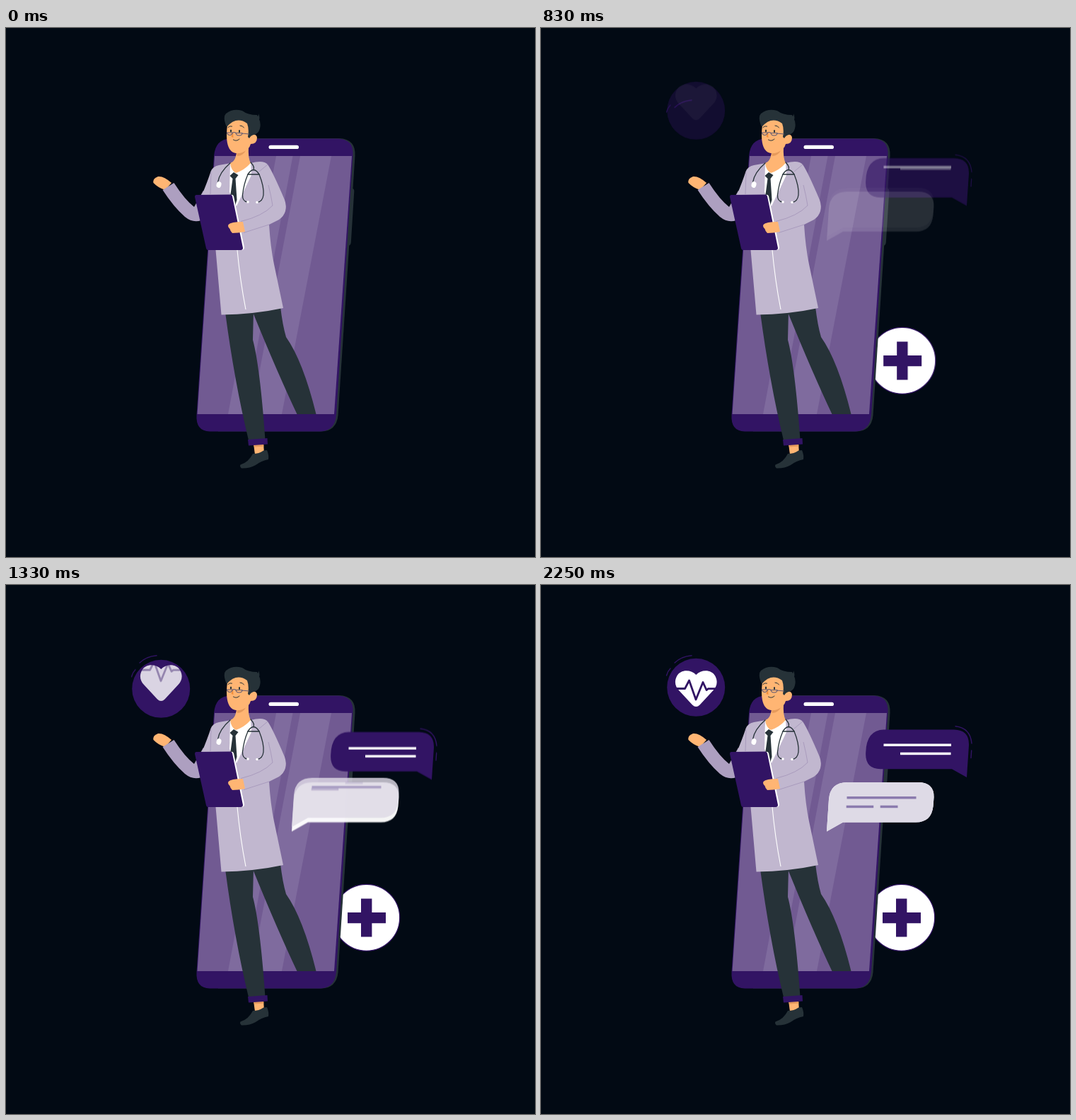
An HTML page for the animation above (2.33 s loop, 748 by 748 pixels).

```html
<!DOCTYPE html>
<html lang="en">
<head>
<meta charset="utf-8">
<title>Online doctor</title>
<style>
  html, body { margin: 0; width: 100%; height: 100%; overflow: hidden; background: #020a14; }
  svg { display: block; width: 100vw; height: 100vh; }
  .purple { fill: #321464; }
  .dark { fill: #263238; }
  .skin { fill: #ffb573; }
  .coat { fill: #c1b7cf; }
  .white { fill: #fff; }
  .line { fill: none; stroke: #263238; stroke-width: 1.3; stroke-linecap: round; }
  .dash { fill: none; stroke: #321464; stroke-width: 1.4; stroke-linecap: round; }
  .fold { fill: none; stroke: #a394b8; stroke-width: .8; }
</style>
</head>
<body>
<svg viewBox="0 0 748 748">
  <g data-delay="0" data-from="x">
    <circle class="white" cx="509.7" cy="470.3" r="47" stroke="#321464" stroke-width="1.2"/>
    <path class="purple" d="M502 443.5h15.4V463H537v15.3h-19.600V497.500H502V478.300H483V463h19z"/>
  </g>

  <g id="phone">
    <path class="dark" d="M320 156H471Q495 157 493.500 181L469.500 548Q467 570 446 570.500H300Z"/>
    <path class="dark" d="M489.500 227Q492.500 227 492.300 231L487.800 303Q487.500 307 484.500 308Z"/>
    <path class="purple" d="M317 156.500H469Q492 157 490.500 180L467 547Q465 570 444 570.500H288Q268 570 269.500 547L294 181Q296 157 317 156.500Z"/>
    <path fill="#715a92" d="M295 181H489L464 546H270.500Z"/>
    <path fill="#7f6b9e" d="M382 181H405.500L337.500 546H314ZM416 181H460L390 546H347Z"/>
    <rect class="white" x="371.500" y="165.700" width="42.500" height="5.400" rx="2.700"/>
  </g>

  <g id="doctor">
    <path class="dark" d="M349 402L388 394Q391 420 396 437Q420 471 438.500 546H411.500Q384 488 349 402Z"/>
    <path class="skin" d="M350 588L364 587L365 601L352 603Z"/>
    <path fill="#e59a5c" d="M350 589L364 588L364.500 591.500L351 592.500Z"/>
    <path class="dark" d="M310 402L350 400L349 441Q359 478 366.500 582L343 583Q323 500 310 402Z"/>
    <path class="purple" d="M342 582L369.500 580L370 588.500L343 590.500Z"/>
    <path class="dark" d="M349 602Q358 602 364 597.500L369 597Q372 604 371 610Q361 612 353 618Q344 623 333 622.500Q330 620 331.500 617.500Q343 614 349 602Z"/>

    <path class="skin" d="M234 219Q223 209 215 210Q207 213 208.500 219Q215 226 225 229Z"/>
    <path fill="#ad9fc0" d="M221.500 229L237.500 219Q253 243 266 253L279 230L296 250L276 272Q264 276 253 267Q237 253 221.500 229Z"/>
    <path class="coat" d="M277 236Q285 217 289.500 203Q292 196 301 194L318 191H346Q364 186 370 193Q377 203 394 243Q400 261 386 271L372 278Q374 310 379 334L392 396Q350 405 304.500 405.500L296.500 314L290 250Z"/>
    <path class="white" d="M317 191L316 232L326 252L347 208L346 190Z"/>
    <path class="skin" d="M326 172L343 168Q342 184 346 191Q337 201 325 205Q318 201 317 191Q326 188 326 172Z"/>
    <path fill="#e59a5c" d="M326 176Q334 177 340 172Q335 181 327 181Z"/>
    <path class="dark" d="M316.500 209L322 204L328.500 208L324.500 213L326.500 243L324 251L317 239L320.500 213Z"/>
    <path class="fold" d="M290 203L289 235M358 203L370 193M371 222Q375 238 377 251Q363 266 332 273.500M336 289.500L372 278"/>
    <path d="M327 314Q331 357 339 398" fill="none" stroke="#fff" stroke-width="1.1"/>

    <path class="line" d="M317 191Q302 204 299.500 218M346 190Q352 196 350 201M341.500 246Q334 245 334.500 236Q336 221 342 207Q350 194 358 207Q365 224 364 236Q363 245 355.500 246.500M341.500 207H358.500"/>
    <ellipse class="white" cx="301" cy="221.500" rx="3.400" ry="4.500" transform="rotate(15 301 221.500)"/>
    <circle class="white" cx="342" cy="246" r="1.800"/>
    <circle class="white" cx="355" cy="246.500" r="1.800"/>

    <path class="white" d="M300 236H318Q321 235 322 238L337 310Q337 313.500 334 314H310Z"/>
    <path class="purple" d="M269 236L317 235.500Q319.500 235.500 320 238L335 311Q335 314 332 314H286Q283.500 314 283 311.500L267 239Q267 236 269 236Z"/>
    <path class="skin" d="M335 274L338 288Q328 290 320 290Q317 287 316.500 284Q313 281 314.500 278Q318 274 335 274Z"/>

    <path class="skin" d="M313 137Q310 161 316 171Q322 180 334 176Q344 172 346 164Q355 164 355 155Q354 149 347 151L344 131L322 126Z"/>
    <path class="dark" d="M312 140Q306 126 311 121Q321 113 334 117Q342 123 355 123L357 127Q361 134 359 142Q357 150 350 151Q346 152 344 156L342 154Q344 143 341 135Q326 124 312 140ZM355 126Q357 125 357 121Q360 128 357 131Z"/>
    <path class="line" d="M314 140.500Q316 138 319.500 139M331 138Q335 138 336.500 141M321.500 158Q326 161 330 157" style="stroke-width:1"/>
    <path d="M321 146L318.500 154L321.500 155Z" fill="#f28f3b"/>
    <ellipse class="dark" cx="318" cy="145.500" rx="1.100" ry="1.900"/>
    <ellipse class="dark" cx="330" cy="146" rx="1.100" ry="1.900"/>
    <path d="M312 148H320Q320 151.500 316 151.500Q313 151 312.500 148M320 148.500Q323 146.500 325 148.500H334Q334 152 329.500 152Q325.500 152 325 148.500M334 149L344 150" fill="none" stroke="#625b72" stroke-width="1.100"/>
  </g>

  <g data-delay="0">
    <path data-delay="0" class="dash" d="M189 110Q198 101 213 99.700"/>
    <path data-delay=".2" class="dash" d="M177.500 128Q179 122 183 118"/>
    <circle data-delay=".4" class="purple" cx="219.200" cy="144.800" r="41"/>
    <path data-delay=".6" class="white" d="M219.300 127C212 119 197 119 192 129C188 137 190 144 195 149L214 169.500Q219.300 174.500 224.500 169.500L243.500 149C248.500 144 250.500 137 246.500 129C241.500 119 226.500 119 219.300 127Z"/>
    <path data-delay=".8" d="M190 146.500H203.500L209.500 135L219 162L229 137.500L234 148.500L236.500 146.700H248.500" fill="none" stroke="#321464" stroke-width="2.800" stroke-linejoin="round"/>
  </g>

  <g data-delay=".2">
    <path data-delay=".2" class="dash" d="M586 199.700Q607 202 609 224"/>
    <path data-delay=".2" class="dash" d="M608.700 234L608 244.500"/>
    <path data-delay=".2" class="purple" d="M485 204.500H584Q606 205 605 227L602 272L581 260.300H480Q458 260 459.200 237Q460 205 485 204.500Z"/>
    <rect data-delay=".3" class="white" x="484.500" y="224.500" width="95.500" height="3.500"/>
    <rect data-delay=".4" class="white" x="508" y="236.700" width="71.500" height="3.500"/>
    <path data-delay=".5" class="white bubble"/>
    <path data-delay=".6" class="bubble" fill="#dedae6"/>
    <g fill="#8b7bae">
      <rect data-delay=".7" x="432.500" y="299" width="98" height="3.500"/>
      <rect data-delay=".8" x="431.700" y="311.700" width="38.500" height="3.500"/>
      <rect data-delay=".9" x="479.700" y="311.700" width="24.800" height="3.500"/>
    </g>
  </g>
</svg>
<script>
  const LOOP = 2330, FRAMES = 56, SECOND = LOOP / 2, SHIFT = 44.9;
  const bubble = 'M433 279H533Q556 279 555.500 300L554.500 313Q552 335.500 530 335.500H427L404 348.500L407 303Q409 279 433 279Z';
  document.querySelectorAll('.bubble').forEach(el => el.setAttribute('d', bubble));

  // Every part fades and slides in with a small overshoot; nested parts add up.
  const slides = [...document.querySelectorAll('[data-delay]')].map(el => {
    const axis = el.dataset.from === 'x' ? 'X' : 'Y';
    const slide = el.animate([
      { opacity: 0, transform: `translate${axis}(${-SHIFT}px)` },
      { opacity: 1, transform: `translate${axis}(0px)` }
    ], {
      duration: SECOND,
      delay: el.dataset.delay * SECOND,
      easing: 'cubic-bezier(.36, -.01, .5, 1.38)',
      fill: 'both'
    });
    slide.pause();
    return slide;
  });

  const step = LOOP / FRAMES;
  const start = performance.now();

  function draw() {
    const time = (performance.now() - start) % LOOP;
    const frame = Math.min(FRAMES - 1, Math.floor((time + 5) / step));
    const at = frame < 3 ? 0 : frame * step;
    for (const slide of slides) slide.currentTime = at;
    requestAnimationFrame(draw);
  }
  draw();
</script>
</body>
</html>
```
